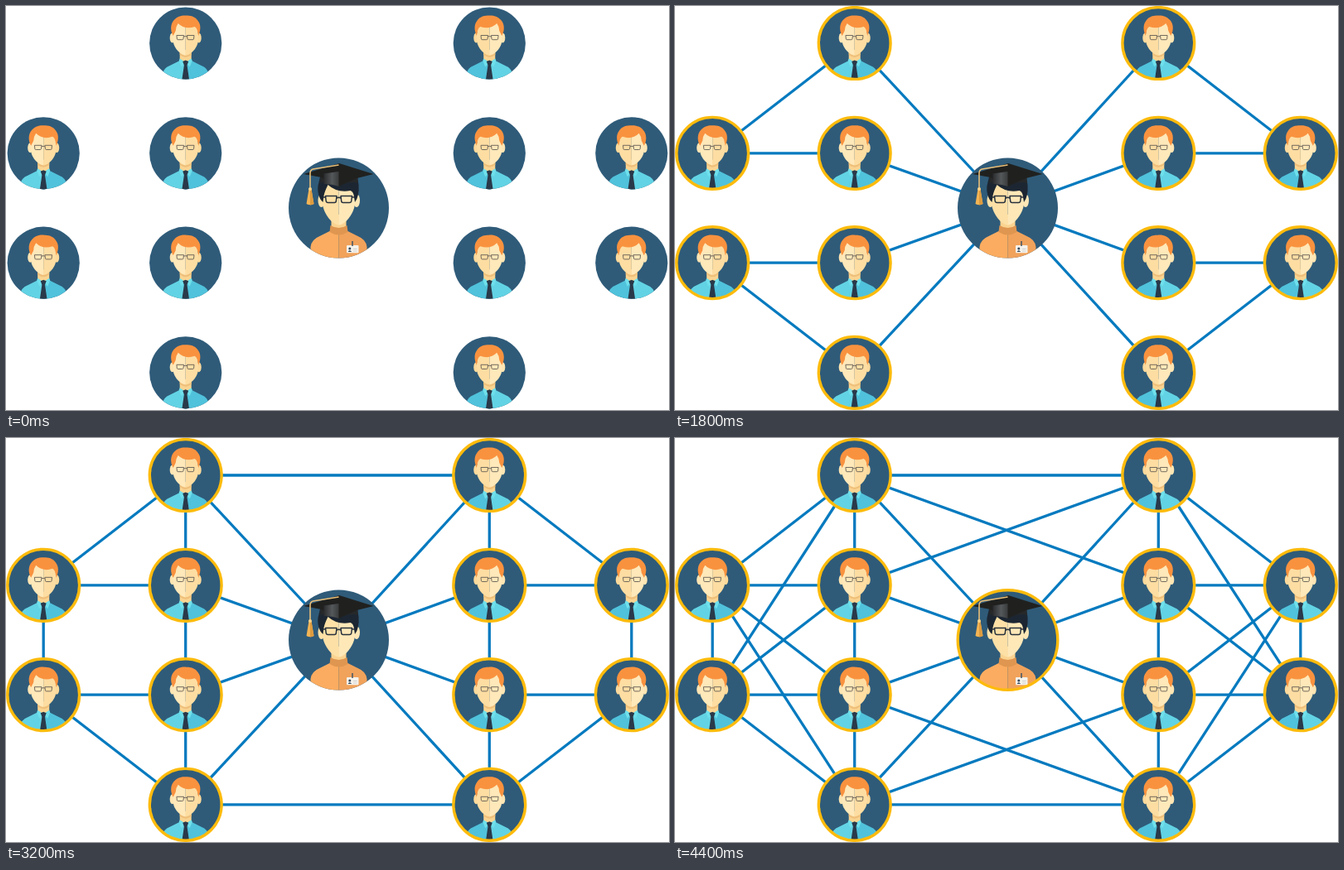
An HTML page that plays this animation: 800 by 488 pixels, repeating every 5.4 s.

```html
<!DOCTYPE html>
<html lang="en">
<head>
<meta charset="utf-8">
<title>Growing network</title>
<style>
  html, body { margin: 0; width: 100%; height: 100%; overflow: hidden; background: #fff; }
  svg { display: block; width: 800px; height: 488px; }
  .link { stroke: #057abf; stroke-width: 3.3; }
  .link.grow { stroke: #fdbb0c; stroke-width: 5; }
  .ring { fill: none; stroke: #fdbb0c; stroke-width: 3.4; }
</style>
</head>
<body>
<svg viewBox="0 0 800 488">
  <defs>
    <clipPath id="disc"><circle r="43.6"/></clipPath>
    <clipPath id="bigDisc"><circle r="60.5"/></clipPath>
    <linearGradient id="sheen">
      <stop offset="0" stop-color="#2a2c2e"/>
      <stop offset=".55" stop-color="#55585a"/>
      <stop offset="1" stop-color="#3a3c3d"/>
    </linearGradient>

    <g id="worker">
      <circle r="43.6" fill="#2f5b79"/>
      <g clip-path="url(#disc)">
        <path d="M-28 46V38Q-27 30-19 27L-7 21H0V46Z" fill="#62d3e4"/>
        <path d="M28 46V38Q27 30 19 27L7 21H0V46Z" fill="#50c2db"/>
        <path d="M-7 8H7V20L0 25-7 20Z" fill="#fad491"/>
        <path d="M-7 11Q0 18 7 11V14Q0 20-7 14Z" fill="#efc07b"/>
        <path d="M-7 18.500L0 23-5 28.500-8 21ZM7 18.500L0 23 5 28.500 8 21Z" fill="#6fe0ec"/>
        <path d="M-3.500 22L0 20.500 3.500 22 1.800 26.500 4.500 45H-4.500L-1.800 26.500-3.500 22Z" fill="#29394a"/>
        <ellipse cx="-16" cy="-6.500" rx="3" ry="6" fill="#fee5b3"/>
        <ellipse cx="16" cy="-6.500" rx="3" ry="6" fill="#fbd99b"/>
        <path d="M0-25H-15V-3C-15 5-6 14.500 0 14.500Z" fill="#ffe8b9"/>
        <path d="M0-25H15V-3C15 5 6 14.500 0 14.500Z" fill="#fddda2"/>
        <path d="M-15-9C-19-16-18-24-14-28C-10-33-4-34 1-33.500C7-34 13-31 15-27C19-22 18-15 15.500-9L14-16Q13-19 11-20Q-1-16-9-24Q-12-20-12-15Z" fill="#f9923f"/>
        <g fill="none" stroke="#625d55" stroke-width=".9">
          <path d="M-10.800-9.500H-2.200L-2.800-5Q-3-4.300-4-4.300H-9Q-10.200-4.300-10.300-5ZM10.300-9.500H1.700L2.300-5Q2.500-4.300 3.500-4.300H8.500Q9.700-4.300 9.800-5ZM-2.200-8Q0-9 1.700-8"/>
        </g>
      </g>
    </g>

    <g id="graduate">
      <circle r="60.5" fill="#2f5b79"/>
      <g clip-path="url(#bigDisc)">
        <path d="M-34 62V47Q-33 38-23 34L-9 27H0V62Z" fill="#fbac60"/>
        <path d="M34 62V47Q33 38 23 34L9 27H0V62Z" fill="#f1a25b"/>
        <path d="M-9 8H9V24H-9Z" fill="#fbd390"/>
        <path d="M-10 21Q0 27 10 21L11 29Q0 36-11 29Z" fill="#df9650"/>
        <ellipse cx="-21" cy="-9" rx="4" ry="8" fill="#fde1a8"/>
        <ellipse cx="21.500" cy="-9" rx="4" ry="8" fill="#fee7b6"/>
        <path d="M0-34H-19.500V-6C-19.500 5-8 20.500 0 20.500Z" fill="#fde0a6"/>
        <path d="M0-34H19.500V-6C19.500 5 8 20.500 0 20.500Z" fill="#fee8b8"/>
        <path d="M-19-7C-24-11-26-20-25-27L-22-40H22L24-28Q25-14 19.500-7L18-16Q17-20 14-21Q-2-18-13-28Q-17-20-18-15Z" fill="#1c2632"/>
        <g fill="none" stroke="#27313c" stroke-width="1.5" stroke-linejoin="round">
          <path d="M-16-14.500H-2.500L-3.200-8Q-3.500-6.500-5-6.500H-13Q-15-6.500-15.300-8.500ZM16-14.500H2.500L3.200-8Q3.500-6.500 5-6.500H13Q15-6.500 15.300-8.500ZM-2.500-12Q0-13.500 2.500-12M-16-13H-19M16-13H19"/>
        </g>
        <rect x="9.500" y="45" width="14.500" height="9.300" rx="1" fill="#f5f2eb"/>
        <path d="M16.500 40V46" stroke="#4e5b66" stroke-width="1.6"/>
        <path d="M11 53Q13.300 49.500 15.600 53Z" fill="#33485a"/>
        <circle cx="13.300" cy="49" r="1.500" fill="#33485a"/>
        <path d="M17.500 49.500H22M17.500 52H22" stroke="#c4c8ca" stroke-width=".8"/>
      </g>
      <path d="M-22-40H23V-30Q12-33 0-26Q-12-33-22-30Z" fill="#262829"/>
      <path d="M-42.500-41L.5-54 42-41 22-36 0-26-21-37Z" fill="#20211f"/>
      <path d="M-18-41.500L0-44V-26Q-8-29-18-29Z" fill="url(#sheen)"/>
      <path d="M0-52L-31-47Q-34.500-46-34.500-42V-22" fill="none" stroke="#e8be78" stroke-width="1.6"/>
      <path d="M-36-23H-33L-30-5Q-34.500-2.500-39-5Z" fill="#f3b455"/>
      <path d="M-34.500-22H-33L-30-5Q-32-3.700-34.500-3.500Z" fill="#dd9c40"/>
      <circle cx="-34.500" cy="-23" r="2" fill="#fad28a"/>
    </g>
  </defs>
  <g id="links"></g>
  <g id="people"></g>
</svg>
<script>
  const LOOP = 5400, STEP = 200, LAST = 22;
  const rows = [45, 177.8, 310.2, 442.8];
  const hub = { x: 401.5, y: 244 };
  const inner = rows.map(y => ({ x: 216.7, y }));
  const outer = rows.map(y => ({ x: 45.2, y }));
  const mirror = p => p === hub ? hub : { x: 800 - p.x, y: p.y };
  const bothSides = pairs => pairs.flatMap(([a, b]) => [[a, b], [mirror(a), mirror(b)]]);
  const across = (i, j) => [inner[i], mirror(inner[j])];

  // start: step of the half-grown pose; two steps later the link turns blue
  const groups = [
    { start: 1, pairs: bothSides(inner.map(p => [hub, p])) },
    { start: 4, pairs: bothSides([1, 2].map(i => [inner[i], outer[i]])) },
    { start: 7, pairs: bothSides([[inner[0], outer[1]], [inner[3], outer[2]]]) },
    { start: 9, both: true, pairs: bothSides([[outer[1], outer[2]], [inner[1], inner[2]]]) },
    { start: 11, pairs: bothSides([[inner[0], inner[1]], [inner[3], inner[2]]]) },
    { start: 14, both: true, pairs: [across(0, 0), across(3, 3)] },
    { start: 17, both: true, pairs: bothSides([[outer[1], inner[2]], [outer[1], inner[3]],
                                               [outer[2], inner[0]], [outer[2], inner[1]]]) },
    { start: 20, both: true, pairs: [across(0, 1), across(1, 0), across(2, 3), across(3, 2)] }
  ];

  const svgNode = (parent, tag, attrs) => {
    const el = document.createElementNS("http://www.w3.org/2000/svg", tag);
    for (const k in attrs) el.setAttribute(k, attrs[k]);
    return parent.appendChild(el);
  };
  const linkLayer = document.getElementById("links");
  const people = document.getElementById("people");

  const links = groups.flatMap(({ start, both, pairs }) => pairs.map(([a, b]) => ({
    start, both,
    el: svgNode(linkLayer, "line", { x1: a.x, y1: a.y, x2: b.x, y2: b.y, pathLength: 1 })
  })));

  const rings = [];
  const addPerson = (p, id, r, from, flip) => {
    const g = svgNode(people, "g", { transform: `translate(${p.x} ${p.y})` });
    svgNode(g, "use", { href: "#" + id, transform: `scale(${flip ? -1 : 1} 1)` });
    rings.push({ from, el: svgNode(g, "circle", { r, class: "ring" }) });
  };
  const addPair = (p, from) => {
    addPerson(p, "worker", 43.4, from, false);
    addPerson(mirror(p), "worker", 43.4, from, true);
  };
  inner.forEach(p => addPair(p, 3));
  [outer[1], outer[2]].forEach(p => addPair(p, 6));
  addPerson(hub, "graduate", 60.3, LAST, false);

  const show = (el, on) => el.setAttribute("visibility", on ? "visible" : "hidden");

  function draw(step) {
    for (const { el, start, both } of links) {
      const age = step - start, growing = age < 2;
      show(el, age >= 0);
      el.setAttribute("class", growing ? "link grow" : "link");
      const part = age < 1 ? 0.5 : 1;
      el.setAttribute("stroke-dasharray",
        part === 1 ? "none" : both ? `${part / 2} ${1 - part} 1` : `${part} 2`);
    }
    // growing links lie above finished ones
    links.filter(l => step === l.start).forEach(l => linkLayer.appendChild(l.el));
    rings.forEach(r => show(r.el, step >= r.from));
  }

  let origin, shown = 0;
  function tick(now) {
    origin ??= now;
    const step = Math.min(LAST, Math.floor((now - origin) % LOOP / STEP));
    if (step !== shown) draw(shown = step);
    requestAnimationFrame(tick);
  }
  draw(0);
  requestAnimationFrame(tick);
</script>
</body>
</html>
```
